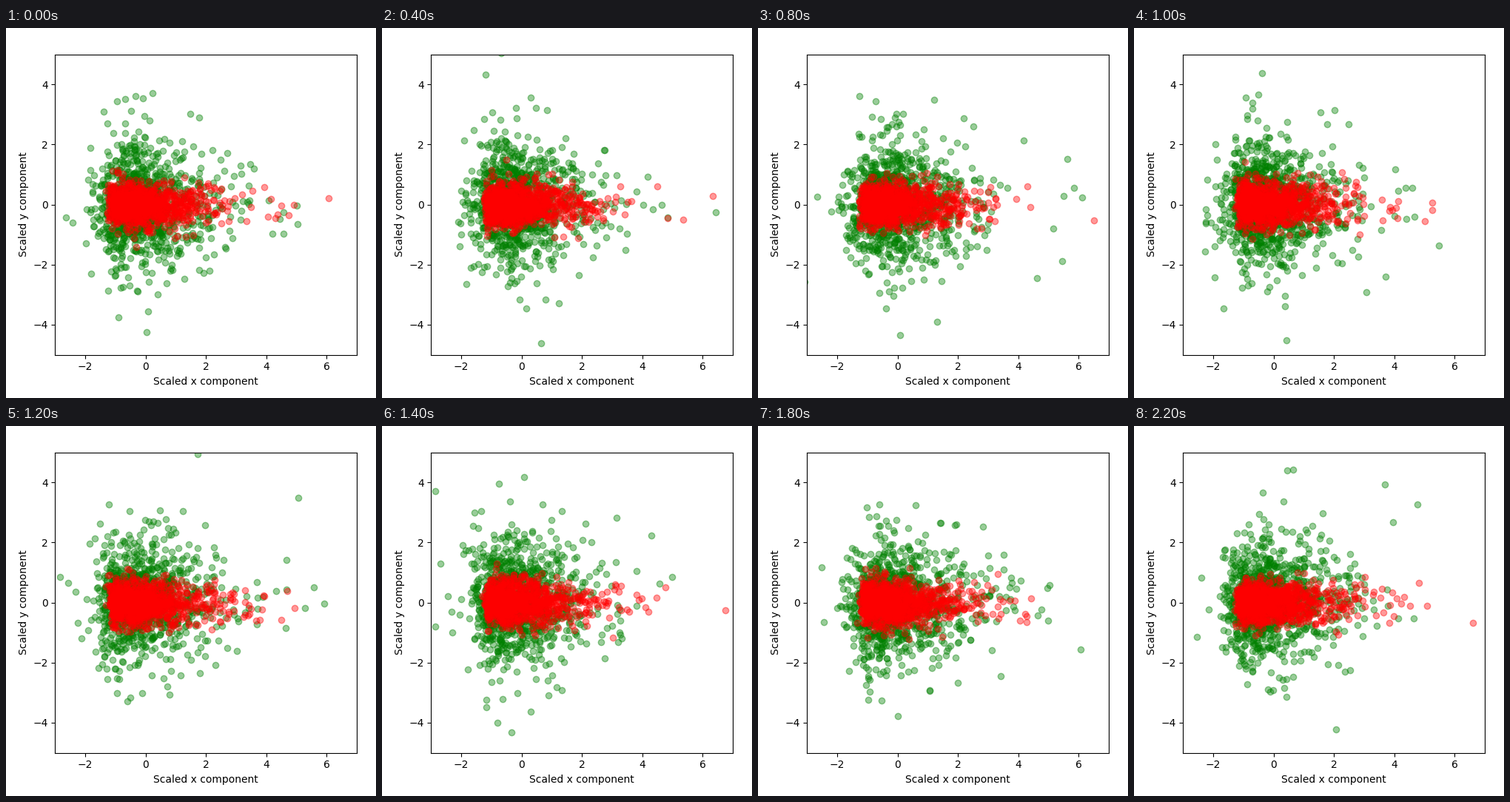
These frames come from a looping animation (500 px wide and 500 px high, 2.4 s). A matplotlib script:

```python
import numpy as np
import matplotlib.pyplot as plt
from matplotlib.animation import FuncAnimation

FRAMES, INTERVAL = 12, 200
COUNT = 1000
SHAPE = 1.5  # gamma shape: steep left side, long right tail


def skewed(rng):
    """Right-skewed values with mean 0 and standard deviation 1."""
    return (rng.gamma(SHAPE, 1, COUNT) - SHAPE) / SHAPE ** .5


def wide_cloud(rng):
    x = skewed(rng) + .35 * rng.standard_t(5, COUNT)
    y = .93 * rng.standard_t(10, COUNT)
    return np.column_stack([x, y])


def narrow_cloud(rng):
    x = skewed(rng) + rng.normal(0, .06, COUNT)
    y = rng.normal(0, .36, COUNT)
    return np.column_stack([x, y])


fig, ax = plt.subplots(figsize=(5, 5), dpi=100)
fig.subplots_adjust(left=.1328, right=.948, bottom=.1168, top=.9288)
ax.set(xlim=(-3, 7), ylim=(-5, 5), xticks=range(-2, 7, 2),
       yticks=range(-4, 5, 2),
       xlabel="Scaled x component", ylabel="Scaled y component")
wide = ax.scatter([], [], color="green", alpha=.4)
narrow = ax.scatter([], [], color="red", alpha=.4)


def update(i):
    # A fresh sample per step, the same in every loop
    rng = np.random.default_rng(40 + i)
    wide.set_offsets(wide_cloud(rng))
    narrow.set_offsets(narrow_cloud(rng))
    return wide, narrow


anim = FuncAnimation(fig, update, frames=FRAMES, interval=INTERVAL,
                     repeat=True, repeat_delay=0)
plt.show()
```
